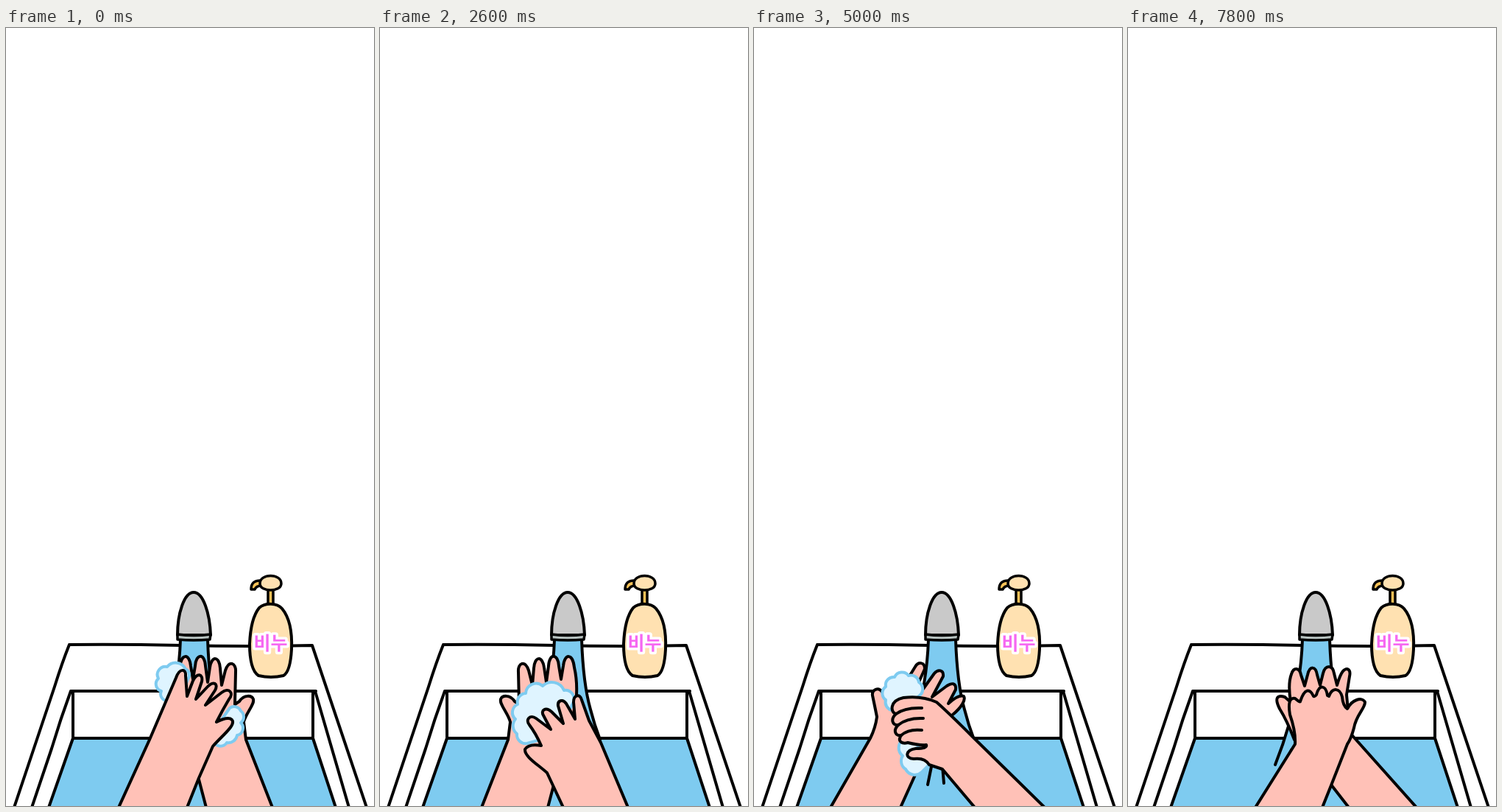
Animation of 500x1056 px, one loop 8 s. Source, as an HTML page with a canvas:

```html
<!DOCTYPE html>
<html lang="ko">
<head>
<meta charset="utf-8">
<title>Hand washing</title>
<style>
html, body { margin: 0; width: 100%; height: 100%; overflow: hidden; background: #fff; }
canvas { display: block; }
</style>
</head>
<body>
<canvas id="stage" width="500" height="1056"></canvas>
<script>
const ctx = document.getElementById('stage').getContext('2d');
const INK = '#000', SKIN = '#ffc1b7', WATER = '#7ecbf0', FOAM = '#dff4ff', CREAM = '#ffe1b1', AMBER = '#f8c258';
const LOOP = 8000, STEP = 200, STEPS_PER_SCENE = 8;

function draw(d, fill, stroke = INK, width = 4) {
  const p = new Path2D(d);
  if (fill) { ctx.fillStyle = fill; ctx.fill(p); }
  if (stroke) { ctx.strokeStyle = stroke; ctx.lineWidth = width; ctx.stroke(p); }
}
const foam = d => draw(d, FOAM, WATER, 4);
const skin = d => draw(d, SKIN);

function drawSink() {
  draw('M86 837 Q150 836 240 838 T416 838 L490 1058 M86 837 Q76 862 66 894 L11 1058');
  draw('M91 964 H417 L448 1058 H58 Z', WATER);
  draw('M88 900 H421 M91 900 V964 M417 900 V964 M88 900 Q74 938 62 978 L35 1058 M420 900 L466 1058');
}

function drawStream() {
  draw('M237 830 Q236 860 231 890 Q222 945 200 1000 H314 Q293 950 286 925 Q276 890 274 830 Z', WATER, null);
  draw('M237 830 Q236 860 231 890 Q222 945 200 1000 M274 830 Q276 890 286 925 Q291 945 299 966');
  draw('M213 998 L206 1018 M222 980 L218 991 M230 996 L222 1010 M244 988 L236 1027 M255 990 L258 1025 M270 988 L276 1025');
}

function drawFaucet() {
  draw('M233 824 C233 795 242 766 255 766 C268 766 277 795 278 824 Z', '#c9c9c9');
  draw('M233 823 Q255 826 278 823 L277 830 Q255 832 233 830 Z', '#b8c3c1', INK, 3.5);
}

function drawBottle() {
  draw('M356 762 H363 V784 H356 Z', AMBER, INK, 3.5);
  draw('M347 750 Q333 749 333 762 L338 762 Q340 757 347 757 Z', AMBER, INK, 3.5);
  draw('M345 754 C345 740 374 740 374 754 C374 766 345 766 345 754 Z', CREAM, INK, 3.5);
  draw('M344 787 C352 780 368 780 375 788 C385 800 389 820 388 843 C387 862 384 875 377 879 Q360 883 343 879 C334 873 331 855 331 836 C332 812 336 797 344 787 Z', CREAM);
  ctx.font = '900 25px "Noto Sans CJK KR", "Noto Sans CJK", sans-serif';
  ctx.textAlign = 'center';
  ctx.textBaseline = 'alphabetic';
  ctx.strokeStyle = '#fff';
  ctx.lineWidth = 7;
  ctx.strokeText('비누', 359.5, 844);
  ctx.fillStyle = '#f668f2';
  ctx.fillText('비누', 359.5, 844);
}

// Palm sliding over the back of the other hand.
function drawBackRub(low) {
  skin('M272 1058 L262 1020 L240 950 L233 905 Q232 885 236 868 C238 849 249 848 251 866 L254 884 L257 866 C258 849 270 848 271 866 L274 888 L277 868 C279 852 290 852 291 869 L293 892 L298 872 C303 857 313 862 312 874 L311 918 L317 914 C324 904 334 906 336 911 C338 918 326 930 323 942 L326 966 L362 1058 Z');
  if (low) {
    foam('M237 915 A12 12 0 0 1 250 899 A18 18 0 0 1 279 893 A14 14 0 0 1 302 903 A12 12 0 0 1 313 918 A12 12 0 0 1 316 938 A14 14 0 0 1 314 958 A12 12 0 0 1 300 971 L260 960 Z');
    skin('M163 1058 L200 970 L216 940 L226 912 C228 903 237 905 237 915 L235 938 L247 917 C252 910 259 913 258 920 L251 944 L267 928 C275 921 282 926 278 933 L268 952 L288 937 C296 931 303 939 297 946 Q288 958 281 974 Q298 971 303 979 C304 989 285 1000 273 1011 L251 1058 Z');
  } else {
    foam('M211 900 A10 10 0 0 1 207 883 A11 11 0 0 1 219 867 A15 15 0 0 1 244 870 A9 9 0 0 1 247 884 L236 914 A12 12 0 0 1 219 913 A9 9 0 0 1 211 900 Z');
    foam('M304 923 A10 10 0 0 1 319 927 A10 10 0 0 1 319 943 A10 10 0 0 1 314 960 A12 12 0 0 1 300 970 A10 10 0 0 1 283 970 L285 950 Z');
    skin('M153 1058 L195 966 L231 882 C236 868 245 870 244 879 L246 907 L254 886 C260 874 268 877 266 887 L258 911 L273 895 C282 885 289 890 284 899 L271 919 L293 902 C303 894 310 903 303 911 Q294 926 286 942 Q302 934 307 939 C313 946 294 960 281 975 L262 1018 L246 1058 Z');
  }
}

// One hand wrapped around the other, turning at the wrist.
function drawWrap(turned) {
  skin('M301 1058 L268 985 L240 940 L230 932 C218 922 212 912 215 907 Q222 904 236 917 L226 898 C225 888 232 889 238 893 L258 908 L243 880 C242 871 250 870 255 876 L270 897 L277 890 L268 870 C268 860 277 860 281 867 L300 898 L318 915 L326 901 C331 894 340 898 339 906 Q336 920 333 935 Q335 950 342 964 L396 1058 Z');
  if (turned) {
    foam('M275 906 A11 11 0 0 1 276 888 A11 11 0 0 1 290 879 A11 11 0 0 1 309 881 A11 11 0 0 1 321 894 A11 11 0 0 1 321 912 A11 11 0 0 1 312 926 L290 920 Z');
    foam('M298 966 A14 14 0 0 1 298 988 A13 13 0 0 1 294 1006 A14 14 0 0 1 272 1010 L262 1000 L285 962 Z');
    skin('M105 1058 L202 963 Q235 930 252 915 Q272 906 297 909 C316 913 315 929 307 931 C315 938 312 947 304 946 C312 954 307 962 300 960 C306 969 298 972 291 970 Q275 974 266 973 Q264 978 280 978 C294 980 296 991 283 992 Q268 990 262 1000 L244 1006 L200 1058 Z');
    draw('M307 931 Q295 922 272 923 M304 946 Q292 936 270 937 M300 960 Q290 951 272 953');
  } else {
    foam('M288 897 A12 12 0 0 1 312 900 A12 12 0 0 1 324 918 A13 13 0 0 1 328 942 A12 12 0 0 1 322 962 A11 11 0 0 1 310 978 A12 12 0 0 1 292 990 A14 14 0 0 1 268 985 L245 950 Z');
    skin('M65 1058 Q135 1000 180 950 Q215 905 243 893 Q270 886 288 898 C298 906 292 914 284 912 C295 918 292 929 284 927 C293 932 289 942 281 940 C289 946 283 953 273 949 Q258 946 250 955 Q256 960 266 957 C274 958 273 968 262 968 Q246 970 240 980 Q225 985 215 1000 L164 1058 Z');
    draw('M284 912 Q272 904 258 903 M284 927 Q272 917 254 915 M281 940 Q268 931 252 929');
  }
}

// Crossed hands with laced fingers.
function drawLaced(low) {
  skin('M300 1058 L272 1022 L226 966 Q216 940 206 924 C198 908 204 905 213 908 L221 915 Q217 890 222 877 C225 867 233 868 235 878 L240 893 L244 878 C247 865 255 866 257 878 L261 892 L265 876 C268 864 278 864 280 876 L284 892 Q288 878 292 873 C298 867 303 871 301 880 L297 905 Q300 930 300 955 L392 1058 Z');
  ctx.save();
  ctx.translate(0, low ? 0 : -17);
  skin('M160 1079 L173 1058 L227 972 Q228 955 220 932 Q216 908 227 910 Q234 916 234 914 C240 896 247 896 252 907 Q254 908 256 905 C260 890 269 892 271 906 L273 907 C278 894 288 896 291 908 Q292 920 298 924 C304 912 318 907 322 915 C322 924 310 932 307 950 Q303 965 298 972 L276 1028 L264 1058 L256 1079 Z');
  ctx.restore();
}

const SCENES = [
  { hands: drawBackRub },
  { hands: drawBackRub, flip: true },
  { hands: drawWrap },
  { hands: drawWrap, flip: true },
  { hands: drawLaced }
];

function render(time) {
  const step = Math.floor((time % LOOP) / STEP);
  const { hands, flip } = SCENES[Math.floor(step / STEPS_PER_SCENE)];
  ctx.fillStyle = '#fff';
  ctx.fillRect(0, 0, 500, 1056);
  ctx.lineJoin = ctx.lineCap = 'round';
  drawSink();
  drawStream();
  drawFaucet();
  drawBottle();
  ctx.save();
  if (flip) {
    ctx.translate(500, 0);
    ctx.scale(-1, 1);
  }
  hands(step % 2 === 1);
  ctx.restore();
}

const start = performance.now();
function tick() {
  render(performance.now() - start);
  requestAnimationFrame(tick);
}
tick();
</script>
</body>
</html>
```
